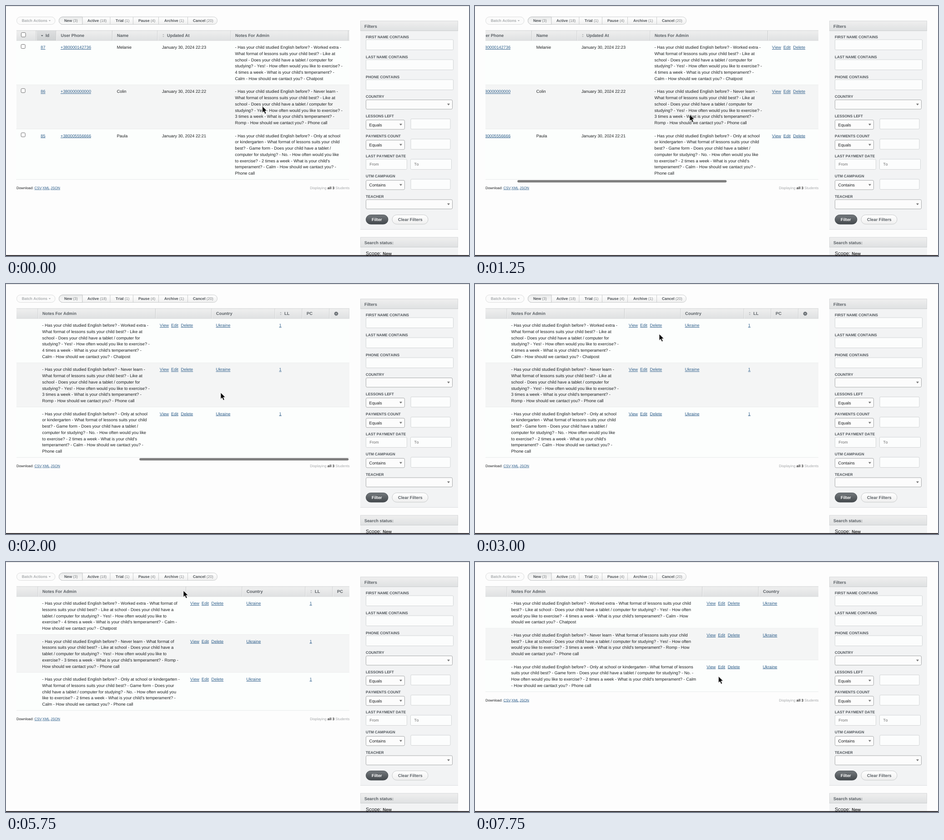
An HTML page for the animation above (8000 ms loop, 1018 px wide and 550 px high).

```html
<!DOCTYPE html>
<html lang="en">
<head>
<meta charset="utf-8">
<title>Students admin</title>
<style>
html, body { margin: 0; width: 100%; height: 100%; overflow: hidden; background: #fdfdfd; }
svg { display: block; }
text { font: 9.24px 'Liberation Sans', Arial, sans-serif; font-kerning: none; fill: #1f2123;
  text-rendering: geometricPrecision; white-space: pre; }
.note { font-size: 9.3px; }
.head { font-size: 9.3px; font-weight: bold; fill: #5a6065; }
.label { font-size: 8.2px; font-weight: bold; fill: #50565b; }
.tab { font-size: 8.4px; font-weight: bold; fill: #505559; }
.count { font-weight: normal; fill: #7d8083; }
.off { fill: #a9acae; }
.small { font-size: 7.9px; }
.pale { fill: #a6a8aa; }
.link { fill: #2f5f8b; text-decoration: underline; text-decoration-thickness: .8px; text-underline-offset: 1px; }
.hint { font-size: 8.6px; fill: #666; }
.white { fill: #fff; }
.scope { font-size: 11px; }
.b { font-weight: bold; fill: #333; }
</style>
</head>
<body>
<svg id="stage" width="1018" height="550" viewBox="0 0 1018 550">
  <defs>
    <linearGradient id="bar" x2="0" y2="1"><stop stop-color="#efefef"/><stop offset="1" stop-color="#dfe1e2"/></linearGradient>
    <linearGradient id="sorted" x2="0" y2="1"><stop stop-color="#dedfe0"/><stop offset="1" stop-color="#ced1d2"/></linearGradient>
    <linearGradient id="light" x2="0" y2="1"><stop stop-color="#fff"/><stop offset="1" stop-color="#efefef"/></linearGradient>
    <linearGradient id="pressed" x2="0" y2="1"><stop stop-color="#ebecec"/><stop offset="1" stop-color="#f9f9f9"/></linearGradient>
    <linearGradient id="dark" x2="0" y2="1"><stop stop-color="#74797d"/><stop offset="1" stop-color="#43484c"/></linearGradient>
    <clipPath id="view"><rect x="23" y="50" width="732" height="500"/></clipPath>
  </defs>
  <g id="page"></g>
  <g clip-path="url(#view)"><g id="table"></g></g>
  <g id="foot"></g>
  <rect id="thumb" y="383" width="460" height="5.2" rx="2.6" fill="#7f7f7f"/>
  <path id="cursor" d="M0 0V14.2L3.3 11.2L5.7 16.8L8.3 15.7L5.9 10.2H10.3Z" fill="#080808" stroke="#fff" stroke-width=".8"/>
  <rect y="548" width="1018" height="2" fill="#2b272b"/>
</svg>
<script>
const $ = id => document.getElementById(id);
const TOP = 76.5, LINE = 13.75, PAD = 14.7, MAX = 424;

const text = (x, y, s, cls = '', extra = '') => `<text x="${x}" y="${y}" class="${cls}" ${extra}>${s}</text>`;
const rect = (x, y, w, h, fill, stroke = 'none', r = 0) =>
  `<rect x="${x}" y="${y}" width="${w}" height="${h}" rx="${r}" fill="${fill}" stroke="${stroke}"/>`;
const line = (x1, y1, x2, y2, color, extra = '') =>
  `<path d="M${x1} ${y1}L${x2} ${y2}" stroke="${color}" ${extra}/>`;
const tri = (x, y, w, h, color) => `<path d="M${x - w} ${y - h / 2}h${2 * w}l${-w} ${h}z" fill="${color}"/>`;
const sorter = x => tri(x, 67.4, 1.9, 2.4, '#b3b6b8') + tri(x, 62.8, 1.9, -2.4, '#b3b6b8');
const box = (x, y, size) => rect(x, y, size, size, '#fff', '#6e6e6e', 2);

const question = [
  'Has your child studied English before?', 'What format of lessons suits your child best?',
  'Does your child have a tablet / computer for studying?', 'How often would you like to exercise?',
  "What is your child's temperament?", 'How should we cantact you?'
];
const notes = answers => answers.split('|').map((a, i) => `- ${question[i]} - ${a}`).join(' ');
const rows = [
  { id: 87, phone: '+380000142736', name: 'Melanie', time: '22:23',
    note: notes('Worked extra|Like at school|Yes!|4 times a week|Calm|Chatpost') },
  { id: 86, phone: '+380000000000', name: 'Colin', time: '22:22',
    note: notes('Never learn|Like at school|Yes!|3 times a week|Romp|Phone call') },
  { id: 85, phone: '+380005556666', name: 'Paula', time: '22:21',
    note: notes('Only at school or kindergarten|Game form|No.|2 times a week|Calm|Phone call') }
];

const pen = document.createElement('canvas').getContext('2d');
pen.font = "93px 'Liberation Sans', Arial, sans-serif";
pen.fontKerning = 'none';
function wrap(s, width) {
  const out = [];
  let cur = '';
  for (const word of s.split(' ')) {
    const next = cur ? cur + ' ' + word : word;
    if (cur && pen.measureText(next).width / 10 > width) { out.push(cur); cur = word; }
    else cur = next;
  }
  return [...out, cur];
}

function drawPage() {
  let s = line(0, .5, 1018, .5, '#d9d9d9');
  s += rect(23.5, 24, 84.5, 16.5, '#fbfbfb', '#dcdddd', 8.2) + text(34.7, 35.4, 'Batch Actions', 'tab off') + tri(96, 32.5, 2.2, 2.6, '#a9acae');
  s += rect(116.5, 24, 348, 16.5, 'url(#light)', '#cbcdce', 8.2);
  s += `<path d="M168 24H124.7a8.2 8.2 0 0 0 0 16.5H168Z" fill="url(#pressed)" stroke="#bfc2c3"/>`;
  for (const x of [229, 279.5, 335.5, 399.5]) s += line(x, 24, x, 40.5, '#cbcdce');
  [['New', 3, 128], ['Active', 18, 179], ['Trial', 1, 241], ['Pause', 4, 291], ['Archive', 1, 348], ['Cancel', 20, 411]]
    .forEach(([name, n, x]) => s += text(x, 35.4, `${name} <tspan class="count">(${n})</tspan>`, 'tab'));

  const panel = (y, h, title) => rect(779, y, 215, h, '#f2f3f4') + rect(779.5, y + .5, 214, 21.5, 'url(#bar)', '#d6d8d9')
    + line(779, y + 22, 994, y + 22, '#cbcecf') + text(788, y + 15, title, 'head');
  const input = (x, y, w, hint = '') => rect(x + .5, y + .5, w - 1, 22.5, '#fcfdfd', '#d2d5d6', 2) + text(x + 8.5, y + 14.8, hint, 'hint');
  const select = (y, w, value = '') => rect(791.5, y + .5, w - 1, 20.5, '#fcfcfc', '#a9abac', 2.5)
    + text(798.5, y + 14.3, value) + tri(782 + w, y + 10.8, 3, 4, '#777');

  s += panel(32.5, 459, 'Filters') + line(779, 491.5, 994, 491.5, '#dcdedf');
  [['FIRST NAME CONTAINS', 70.5], ['LAST NAME CONTAINS', 114.5], ['PHONE CONTAINS', 158.5], ['COUNTRY', 202.3],
    ['LESSONS LEFT', 244.5], ['PAYMENTS COUNT', 288.7], ['LAST PAYMENT DATE', 333], ['UTM CAMPAIGN', 377], ['TEACHER', 421.6]]
    .forEach(([name, y]) => s += text(791, y, name, 'label'));
  for (const y of [73.5, 117.5, 161.5]) s += input(791, y, 193);
  s += select(206, 191) + select(425.5, 191);
  [['Equals', 250.3], ['Equals', 294.7], ['Contains', 383]].forEach(([v, y]) => s += select(y, 86, v) + input(889.5, y - 2.5, 88));
  s += input(791, 336.5, 91, 'From') + input(889, 336.5, 91, 'To');
  s += rect(791.5, 459.5, 48.5, 20.5, 'url(#dark)', '#484e53', 10.2) + text(804, 473.2, 'Filter', 'head white');
  s += rect(849, 459.5, 79, 20.5, 'url(#light)', '#c9cbcc', 10.2) + text(862, 473.2, 'Clear Filters', 'head');
  s += panel(508.5, 42, 'Search status:');
  s += text(791, 548, 'Scope: <tspan class="b" font-size="9.6">New</tspan>', 'scope');
  $('page').innerHTML = s;
}

function drawTable(scroll, grow) {
  const end = 1179 + grow;
  const at = x => x + grow;
  let s = rect(23, 54, end - 23, 22, 'url(#bar)') + rect(66, 54, 44, 22, 'url(#sorted)');
  for (const y of [54, 76.3]) s += line(23, y, end, y, '#d0d2d3');
  for (const x of [66, 110, 233.5, 333, 494, ...[752.5, 876, 1015, 1075, 1135, 1179].map(at)])
    s += line(x, 54, x, 76, '#c8cbcc') + line(x + 1, 55, x + 1, 76, '#f3f3f3');
  [['Id', 87], ['User Phone', 120.5], ['Name', 244], ['Updated At', 354], ['Notes For Admin', 504],
    ['Country', at(886)], ['LL', at(1036)], ['PC', at(1085)]].forEach(([h, x]) => s += text(x, 68.4, h, 'head'));
  s += box(33.5, 58.5, 9.6) + tri(79.3, 65.5, 2.4, 3, '#5e6469') + sorter(346) + sorter(at(1028));
  s += `<circle cx="${at(1150)}" cy="65.3" r="2.9" fill="#a0a4a7" stroke="#5e6469" stroke-width="1.7"/>`
    + `<circle cx="${at(1150)}" cy="65.3" r="4.1" fill="none" stroke="#5e6469" stroke-dasharray="1.6 1.62"/>`;

  let y = TOP;
  rows.forEach((r, i) => {
    const lines = wrap(r.note, 237.4 + grow * 1.01);
    const h = lines.length * LINE + PAD, base = y + 17.6;
    s += rect(23, y, end - 23, h, i % 2 ? '#f4f5f5' : '#fcfefd');
    s += line(23, y + h - .3, end, y + h - .3, '#dfe1e1', 'stroke-dasharray="2 1"');
    s += box(33.2, y + 8, 9);
    s += text(76.3, base, r.id, 'link') + text(120, base, r.phone, 'link') + text(243.7, base, r.name)
      + text(343, base, 'January 30, 2024 ' + r.time);
    lines.forEach((l, n) => s += text(503.6, base + n * LINE, l, 'note'));
    [['View', 762], ['Edit', 787], ['Delete', 808.5], ['Ukraine', 885.5], ['1', 1024.6]]
      .forEach(([l, x]) => s += text(at(x), base, l, 'link'));
    y += h;
  });
  $('table').innerHTML = s;
  $('table').setAttribute('transform', `translate(${-scroll})`);

  const fy = y + 20.9;
  $('foot').innerHTML = text(23, fy, 'Download:', 'small')
    + [['CSV', 62.5], ['XML', 80], ['JSON', 98]].map(([l, x]) => text(x, fy, l, 'small link')).join('')
    + text(755.5, fy, 'Displaying <tspan class="b">all 3</tspan> Students', 'small pale', 'text-anchor="end"');
}

// time, cursor x, cursor y, scroll, column growth, scrollbar opacity
const steps = [
  [0, 563.7, 220.6, 0, 0, 0], [250, 542, 225, 0, 0, 0], [500, 503, 234, 0, 0, 0], [750, 472, 239, 0, 0, 0],
  [1000, 472, 239, 26, 0, 1], [1250, 472, 239, 109, 0, 1], [1500, 472, 239, 250, 0, 1], [1750, 472, 239, 390, 0, 1],
  [2000, 472, 239, MAX, 0, 1], [2500, 472, 239, MAX, 0, .4], [2750, 445, 190, MAX, 0, 0], [3000, 405, 110, MAX, 0, 0],
  [3250, 385, 49, MAX, 0, 0], [3500, 390, 98, MAX, 0, 0], [3750, 362, 87, MAX, 0, 0], [4000, 328, 70, MAX, 0, 0],
  [4250, 321.5, 66, MAX, 0, 0], [5000, 322, 67, MAX, 0, 0], [5250, 322, 66.5, MAX, 0, 0],
  [5750, 390, 63, MAX, 67, 0], [6000, 440, 63, MAX, 117, 0], [6250, 491.5, 64, MAX, 168.7, 0],
  [6500, 495, 65, MAX, 171.2, 0], [6750, 495, 167, MAX, 171.2, 0], [7000, 495, 232, MAX, 171.2, 0],
  [7500, 515, 242, MAX, 171.2, 0], [7750, 535.3, 251.6, MAX, 171.2, 0]
];

let shown;
function update(t) {
  const step = steps.findLast(k => k[0] <= t);
  if (step === shown) return;
  shown = step;
  const [, x, y, scroll, grow, alpha] = step;
  drawTable(scroll, grow);
  $('thumb').setAttribute('x', 24 + scroll * .635);
  $('thumb').setAttribute('opacity', alpha);
  $('cursor').setAttribute('transform', `translate(${x} ${y})`);
}

drawPage();
const start = performance.now();
(function tick() {
  update((performance.now() - start) % 8000);
  requestAnimationFrame(tick);
})();
</script>
</body>
</html>
```
